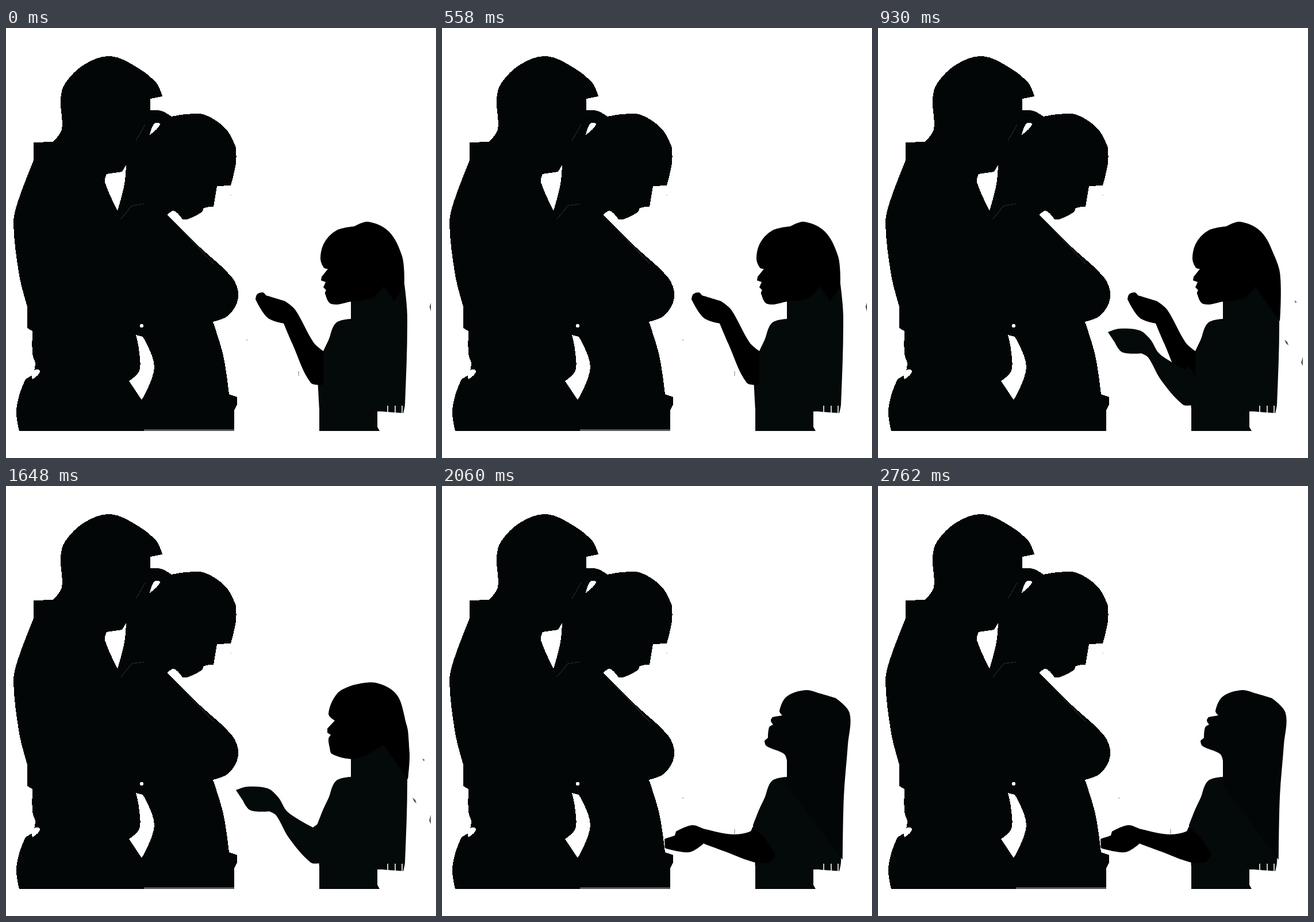
Write an HTML page that moves like this. It is 748 px wide and 748 px high and loops after 3230 ms.

```html
<!DOCTYPE html>
<html lang="en">
<head>
<meta charset="utf-8">
<title>Family silhouettes</title>
<style>
  html, body { margin: 0; width: 100%; height: 100%; overflow: hidden; background: #fff; }
  svg { display: block; width: 100vw; height: 100vh; }
  .couple { fill: #020606; shape-rendering: crispEdges; }
  .body { fill: #040909; }
  .gap { fill: #fff; }
  .slits { stroke: #fff; stroke-width: 1.6; }
  .sheen { fill: none; stroke: #1b2023; stroke-width: 1.5; }

  /* Poses change hard at 930, 1030 and 2060 ms of a 3230 ms loop. */
  .first, .early, .middle, .third, .last, .ends, .rest { animation: 3230ms step-end infinite; }
  .first  { animation-name: first; }
  .early  { animation-name: early; }
  .middle { animation-name: middle; }
  .third  { animation-name: third; }
  .last   { animation-name: last; }
  .ends   { animation-name: ends; }
  .rest   { animation-name: rest; }
  @keyframes first  { 0% { opacity: 1 } 28.793%, 100% { opacity: 0 } }
  @keyframes early  { 0% { opacity: 1 } 31.889%, 100% { opacity: 0 } }
  @keyframes middle { 0% { opacity: 0 } 28.793% { opacity: 1 } 63.777%, 100% { opacity: 0 } }
  @keyframes third  { 0% { opacity: 0 } 31.889% { opacity: 1 } 63.777%, 100% { opacity: 0 } }
  @keyframes last   { 0% { opacity: 0 } 63.777%, 100% { opacity: 1 } }
  @keyframes ends   { 0% { opacity: 1 } 28.793% { opacity: 0 } 63.777%, 100% { opacity: 1 } }
  @keyframes rest   { 0% { opacity: 1 } 28.793% { opacity: 0 } 31.889%, 100% { opacity: 1 } }
</style>
</head>
<body>
<svg viewBox="0 0 748 748">
  <g class="couple">
    <path class="man" data-curve="182,49 137,63 103,96 95,124 97,176 82,198* 48,199* 48,230* 20,304 13,340
      23,430 37,485* 37,522* 46,527* 46,567 51,582* 47,602 33,613 18,663 23,701* 260,701* 260,300*
      251,190* 251,123* 272,119* 262,96 229,69"/>
    <path class="woman" data-curve="230,701* 397,701* 397,665* 402,655* 402,642* 388,637* 378,570 360,511*
      387,500 404,469 394,435 338,382 281,325* 292,318 307,333* 315,333 340,321 345,313 361,311*
      367,275* 391,274* 400,235 400,208* 383,176 346,151 313,150 288,154* 270,144 250,143* 210,235* 210,500*"/>
    <g class="gap">
      <path data-curve="175,254* 202,250* 209,238* 206,272 194,318* 172,268"/>
      <path data-curve="250,186* 258,166 268,168"/>
      <path data-curve="226,534* 238,537* 258,590 236,647* 214,614* 232,596 231,558"/>
      <path data-curve="46,611* 46,597 59,597"/>
      <circle cx="236" cy="518" r="3"/>
    </g>
    <path class="sheen" d="M200 332 219 309 240 306M305 351 361 410M226 196 242 168"/>
    <path class="rest" fill="#555b5d" d="M240 698H397V701H240Z"/>
  </g>

  <path class="body" data-curve="600,465* 692,437* 698,500 694,655 691,670* 653,667* 646,667* 646,694*
    650,701* 545,701* 545,661* 541,590* 552,562 561,543 574,513 600,506*"/>

  <g class="early">
    <path class="head" data-curve="630,337 606,345* 575,352 554,373 547,400 553,417 560,419* 549,433* 548,439*
      556,442* 552,451* 557,456* 555,462 566,480 600,476 638,469 657,449* 675,475* 690,453 693,438*
      689,397 666,354"/>
    <path class="arm" data-curve="552,562* 535,547 503,490 485,475* 452,465* 447,460 437,463 434,472*
      455,504 483,514* 498,549 530,617 552,620*"/>
  </g>

  <g class="middle">
    <path class="hair" data-curve="680,376* 699,425 699,510* 657,450*"/>
    <path class="body" data-curve="400,529* 420,523 455,526 474,542 490,567 534,594* 542,588* 560,620*
      546,656* 530,655 492,612 470,573 458,566* 425,564 412,547*"/>
  </g>

  <path class="third" data-curve="642,342 605,346* 577,360 561,396 572,408* 559,422* 559,429* 565,433*
    561,440 563,455 567,466 600,475 622,470 657,450* 699,510* 702,465 693,400 678,361"/>

  <g class="last">
    <path fill="#020606" data-curve="633,355 600,366 587,391 592,399* 575,402* 572,408 576,415* 569,420
      567,438* 561,443* 564,452 595,466 600,478* 600,520* 697,650* 699,540 706,450 709,395 685,369* 658,361"/>
    <path class="arm" data-curve="387,614* 405,608* 407,601* 435,590 458,597 505,606 536,601 540,593*
      560,611 580,642* 571,655* 545,655 490,635 455,622* 430,637 388,630*"/>
  </g>

  <path class="slits" d="M664 657v15m13-15v15m12-15v15"/>

  <!-- stray specks -->
  <circle cx="391" cy="291" r="1.3" fill="#ddd"/>
  <g class="ends" fill="#bbb">
    <circle cx="419" cy="543" r="1.2"/>
    <path d="M508 597h2v8h-2z"/>
  </g>
  <path class="first" fill="#222" d="M739 478l-2 7 2 8z"/>
  <g class="middle" fill="#555">
    <path d="M724 474l4 2-1 3z"/>
    <path d="M707 542l5 4 2 6-4-3z"/>
    <path d="M739 572l-3 10 3 6z"/>
  </g>
</svg>
<script>
  // Smooth closed outline through a few points; a star marks a sharp corner.
  function outline(text) {
    const points = text.trim().split(/\s+/).map(word => {
      const [x, y] = word.split(',').map(parseFloat);
      return { x, y, sharp: word.endsWith('*') };
    });
    const at = i => points[(i + points.length) % points.length];
    const handle = (i, length) => {
      const p = at(i), a = at(i - 1), b = at(i + 1);
      const scale = p.sharp ? 0 : length / 3 / Math.hypot(b.x - a.x, b.y - a.y);
      return [p.x + (b.x - a.x) * scale, p.y + (b.y - a.y) * scale];
    };
    return points.reduce((d, p, i) => {
      const q = at(i + 1), length = Math.hypot(q.x - p.x, q.y - p.y);
      return `${d}C${handle(i, length)} ${handle(i + 1, -length)} ${q.x},${q.y}`;
    }, `M${points[0].x},${points[0].y}`) + 'Z';
  }
  for (const path of document.querySelectorAll('[data-curve]')) {
    path.setAttribute('d', outline(path.dataset.curve));
  }
</script>
</body>
</html>
```
